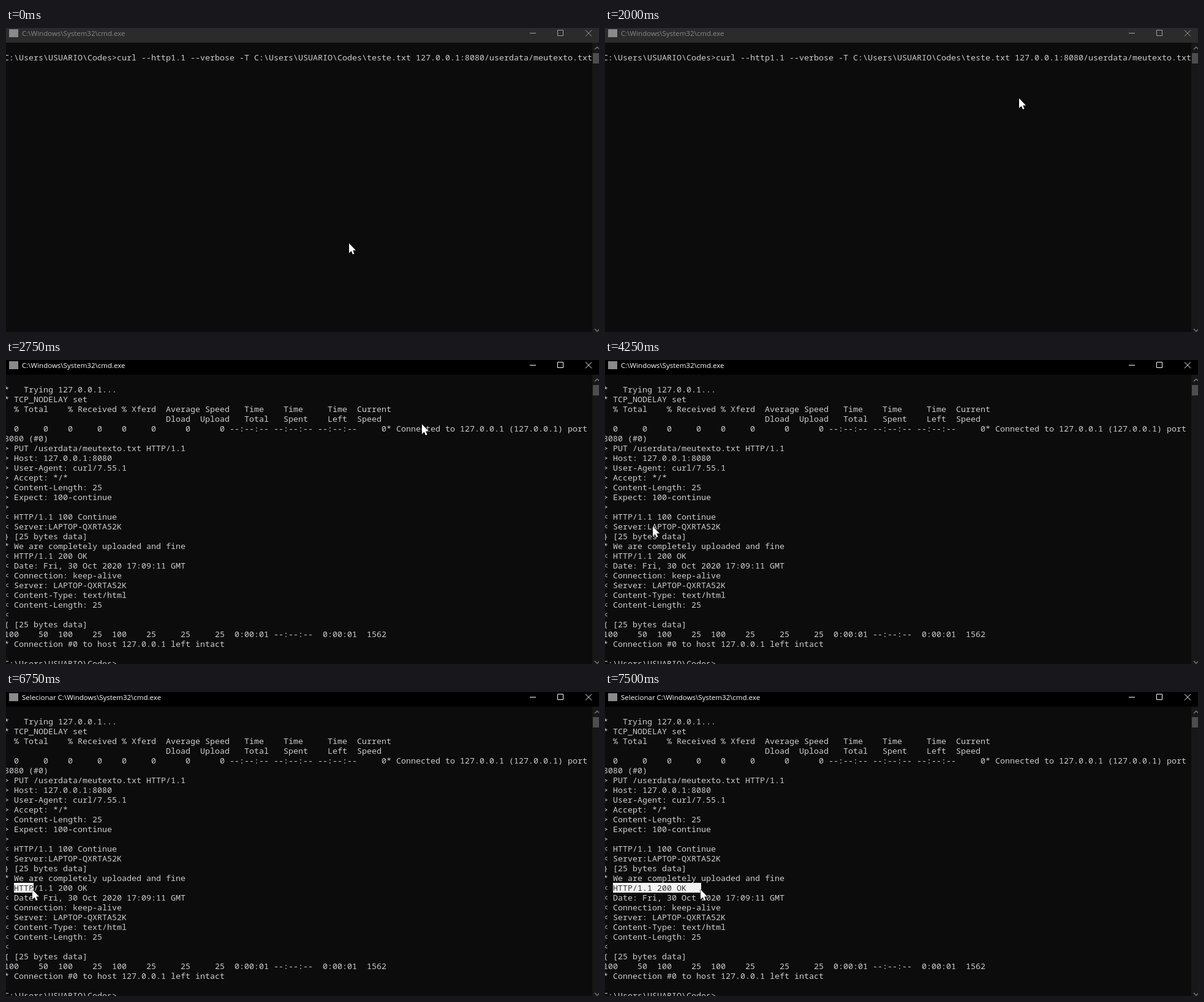
Animation of 968x497 px, one loop 8000 ms. Source, as an HTML page with a canvas:

```html
<!DOCTYPE html>
<html lang="pt">
<head>
<meta charset="utf-8">
<title>Console</title>
<style>
  html, body { margin: 0; width: 100%; height: 100%; overflow: hidden; background: #0c0c0c; }
  canvas { display: block; }
</style>
</head>
<body>
<canvas id="stage" width="968" height="497"></canvas>
<script>
const ctx = document.getElementById('stage').getContext('2d');
const WIDTH = 968, HEIGHT = 497, LOOP = 8000, STEP = 250;
const CELL = 8, ROW = 16, LEFT = -3, TOP = 24;
const ACTIVE = 2250, OUTPUT = 2750, SELECT = 6500;
const SELECT_ROW = 18, SELECT_COL = 2;

const command = String.raw`
C:\Users\USUARIO\Codes>curl --http1.1 --verbose -T C:\Users\USUARIO\Codes\teste.txt 127.0.0.1:8080/userdata/meutexto.txt`.split('\n');

const output = String.raw`
*   Trying 127.0.0.1...
* TCP_NODELAY set
  % Total    % Received % Xferd  Average Speed   Time    Time     Time  Current
                                 Dload  Upload   Total   Spent    Left  Speed
  0     0    0     0    0     0      0      0 --:--:-- --:--:-- --:--:--     0* Connected to 127.0.0.1 (127.0.0.1) port
8080 (#0)
> PUT /userdata/meutexto.txt HTTP/1.1
> Host: 127.0.0.1:8080
> User-Agent: curl/7.55.1
> Accept: */*
> Content-Length: 25
> Expect: 100-continue
>
< HTTP/1.1 100 Continue
< Server:LAPTOP-QXRTA52K
} [25 bytes data]
* We are completely uploaded and fine
< HTTP/1.1 200 OK
< Date: Fri, 30 Oct 2020 17:09:11 GMT
< Connection: keep-alive
< Server: LAPTOP-QXRTA52K
< Content-Type: text/html
< Content-Length: 25
<
{ [25 bytes data]
100    50  100    25  100    25     25     25  0:00:01 --:--:--  0:00:01  1562
* Connection #0 to host 127.0.0.1 left intact

C:\Users\USUARIO\Codes>`.split('\n');

// Pointer moves: arrival time, place, duration.
const moves = [
  { at: 250, x: 705, y: 266 },
  { at: 1000, x: 668, y: 231 },
  { at: 2000, x: 676, y: 115 },
  { at: 2750, x: 679, y: 105 },
  { at: 4250, x: 78, y: 272, time: 1000 },
  { at: 5250, x: 21, y: 341, time: 1000 },
  { at: 5750, x: 18, y: 347, time: 500 },
  { at: 6250, x: 19, y: 324, time: 500 },
  { at: 6750, x: 43, y: 323 },
  { at: 7000, x: 156, y: 323 }
];

// Sideways motion slows down while vertical motion stays even, so long moves curve.
function pointerAt(t) {
  const now = Math.floor(t / STEP) * STEP;
  let x = 560, y = 352;
  for (const { at, time = STEP, ...to } of moves) {
    const u = Math.min(1, Math.max(0, 1 - (at - now) / time));
    x += (to.x - x) * Math.sin(u * Math.PI / 2);
    y += (to.y - y) * u;
  }
  return [Math.round(x), Math.round(y)];
}

function box(x, y, w, h, color) {
  ctx.fillStyle = color;
  ctx.fillRect(x, y, w, h);
}

function lines(color, width, path) {
  ctx.strokeStyle = color;
  ctx.lineWidth = width;
  ctx.stroke(new Path2D(path));
}

// Every word starts on the character grid.
function textRow(text, row, color) {
  ctx.fillStyle = color;
  ctx.font = '13.3333px "Noto Sans Mono", monospace';
  for (const word of text.matchAll(/\S+/g))
    ctx.fillText(word[0], LEFT + word.index * CELL, TOP + row * ROW + 13);
}

function titleBar(t) {
  const active = t >= ACTIVE;
  box(0, 0, WIDTH, TOP, active ? '#000000' : '#2b2b2b');
  box(5, 2, 15, 13, '#8a8a8a');
  ctx.fillStyle = active ? '#ffffff' : '#888888';
  ctx.font = '11.5px "Open Sans", sans-serif';
  ctx.fillText((t >= SELECT ? 'Selecionar ' : '') + 'C:\\Windows\\System32\\cmd.exe', 26, 13);
  lines(active ? '#ffffff' : '#a0a0a0', 1, 'M855 8.5h10 M900.5 3.5h9v9h-9z M946 3.5l10 10 m0 -10l-10 10');
}

function scrollBar() {
  box(957, TOP, 11, HEIGHT - TOP, '#171717');
  box(958, 41, 10, 17, '#4d4d4d');
  lines('#777777', 1.5, 'M961 35l4 -4l4 4 M961 492l4 4l4 -4');
}

function selection(x) {
  const left = LEFT + SELECT_COL * CELL;
  const right = LEFT + (Math.floor((x - LEFT) / CELL) + 1) * CELL;
  const y = TOP + SELECT_ROW * ROW;
  ctx.save();
  ctx.beginPath();
  ctx.rect(left, y, right - left, ROW);
  ctx.clip();
  box(left, y, right - left, ROW, '#f3f3f3');
  textRow(output[SELECT_ROW], SELECT_ROW, '#333333');
  ctx.restore();
}

const arrowShape = new Path2D('M0 0V16L3.7 12.5L6 18L8.5 17L6.2 11.5H11Z');

function arrow(x, y) {
  ctx.save();
  ctx.translate(x, y);
  lines('#000000', 1, arrowShape);
  ctx.fillStyle = '#ffffff';
  ctx.fill(arrowShape);
  ctx.restore();
}

function draw(t) {
  const [x, y] = pointerAt(t);
  box(0, 0, WIDTH, HEIGHT, '#0c0c0c');
  (t < OUTPUT ? command : output).forEach((text, row) => textRow(text, row, '#cccccc'));
  if (t >= SELECT) selection(x);
  titleBar(t);
  scrollBar();
  arrow(x, y);
}

const start = performance.now();
function tick(now) {
  draw(Math.max(0, now - start) % LOOP);
  requestAnimationFrame(tick);
}
draw(0);
requestAnimationFrame(tick);
</script>
</body>
</html>
```
